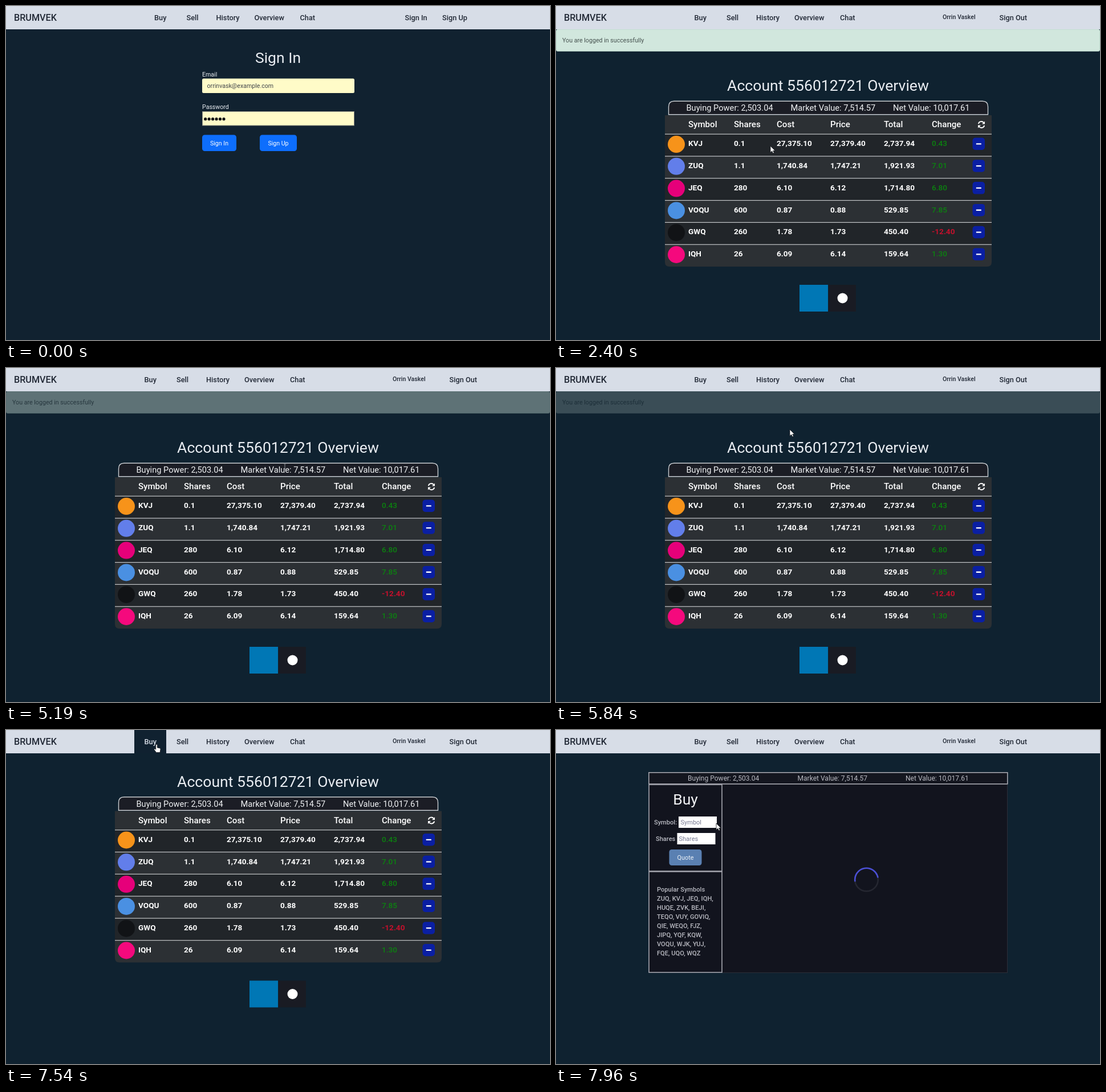
An HTML page for the animation above (8000 ms loop, 954 px wide and 587 px high).

```html
<!DOCTYPE html>
<html lang="en">
<head>
<meta charset="utf-8">
<title>Trading app</title>
<style>
  html, body { margin: 0; width: 100%; height: 100%; overflow: hidden; background: #112230; }
  svg { display: block; width: 100vw; height: 100vh; font-family: Roboto, Arial, sans-serif; }
</style>
</head>
<body>
<svg id="stage" viewBox="0 0 954 587" xmlns="http://www.w3.org/2000/svg"></svg>
<script>
const NS = 'http://www.w3.org/2000/svg';
const LOOP = 8000;
const stage = document.getElementById('stage');

function add(parent, tag, attrs = {}, content) {
  const node = document.createElementNS(NS, tag);
  for (const key in attrs) node.setAttribute(key, attrs[key]);
  if (content !== undefined) node.textContent = content;
  parent.appendChild(node);
  return node;
}
const group = (parent = stage) => add(parent, 'g');
const rect = (p, x, y, width, height, fill, more) =>
  add(p, 'rect', { x, y, width, height, fill, ...more });
const circle = (p, cx, cy, r, fill) => add(p, 'circle', { cx, cy, r, fill });
const path = (p, d, more) => add(p, 'path', { d, ...more });
const text = (p, x, y, str, size, fill, weight = 400, anchor = 'start') =>
  add(p, 'text', { x, y, 'font-size': size, fill, 'font-weight': weight, 'text-anchor': anchor }, str);

const INK = '#222936', LIGHT = '#e9edf2', BLUE = '#0d6efd';

const backdrop = rect(stage, 0, 0, 954, 587, '#112230');

// Sign-in page
const signIn = group();
text(signIn, 477, 99.5, 'Sign In', 26.5, LIGHT, 400, 'middle');
text(signIn, 344, 123.5, 'Email', 10.6, LIGHT);
rect(signIn, 344, 127.5, 267, 25.5, '#fffbc8', { rx: 2.5 });
text(signIn, 352.5, 144.3, 'orrinvask@example.com', 10.6, '#41454a');
text(signIn, 344, 181, 'Password', 10.6, LIGHT);
rect(signIn, 344.5, 185.5, 266, 24.5, '#fffbc8', { stroke: '#8b8b80' });
for (let i = 0; i < 6; i++) circle(signIn, 349.7 + i * 6.45, 198.7, 2.6, '#0d0f14');
const signInButton = rect(signIn, 344, 226.5, 60, 28.5, BLUE, { rx: 4.5 });
text(signIn, 374, 244.6, 'Sign In', 10.6, '#fff', 400, 'middle');
rect(signIn, 445, 226.5, 65, 28.5, BLUE, { rx: 4.5 });
text(signIn, 477.5, 244.6, 'Sign Up', 10.6, '#fff', 400, 'middle');

// Account overview page
const overview = group();
const STATS = ['Buying Power: 2,503.04', 'Market Value: 7,514.57', 'Net Value: 10,017.61'];
const COLS = [232, 312, 387, 481, 575, 659];
const ROWS = [
  ['#f7931a', 'KVJ', '0.1', '27,375.10', '27,379.40', '2,737.94', '0.43'],
  ['#627eea', 'ZUQ', '1.1', '1,740.84', '1,747.21', '1,921.93', '7.01'],
  ['#e6007a', 'JEQ', '280', '6.10', '6.12', '1,714.80', '6.80'],
  ['#4a90e2', 'VOQU', '600', '0.87', '0.88', '529.85', '7.85'],
  ['#111316', 'GWQ', '260', '1.78', '1.73', '450.40', '-12.40'],
  ['#f5097d', 'IQH', '26', '6.09', '6.14', '159.64', '1.30']
];
const ROW_H = 38.8;

text(overview, 477, 149, 'Account 556012721 Overview', 26.6, LIGHT, 400, 'middle');
path(overview, 'M191 192H764V450Q764 458 756 458H199Q191 458 191 450Z', { fill: '#2c3034' });
path(overview, 'M197.5 190.7V177Q197.5 167.3 207 167.3H748Q757.5 167.3 757.5 177V190.7Z',
  { fill: '#1b1d25', stroke: '#c9ccd0', 'stroke-width': 1.4 });
STATS.forEach((s, i) => text(overview, [228.5, 411.5, 591][i], 184, s, 14.65, '#f0f2f4'));
['Symbol', 'Shares', 'Cost', 'Price', 'Total', 'Change'].forEach((s, i) =>
  text(overview, COLS[i], 213.4, s, 15.1, '#fff', 500));

// Refresh icon
path(overview, 'M740.8 207A5.2 5.2 0 0 1 750 205M751.2 210A5.2 5.2 0 0 1 742 212',
  { fill: 'none', stroke: '#fff', 'stroke-width': 1.9 });
path(overview, 'M752 202.5V207.5H747ZM740 214.5V209.5H745Z', { fill: '#fff' });

ROWS.forEach(([color, ...cells], i) => {
  const y = 225.2 + i * ROW_H;
  if (i % 2 === 0) rect(overview, 191, y, 573, ROW_H, '#212529');
  rect(overview, 191, y - 0.6, 573, 1.2, '#c3c6c8');
  circle(overview, 211, y + 17.8, 15, color);
  cells.forEach((s, c) => {
    const loss = s[0] === '-';
    const fill = c < 5 ? '#fff' : loss ? '#c4102c' : '#0b830f';
    text(overview, COLS[c], y + 21, s, 13.6, fill, c < 5 || loss ? 700 : 500);
  });
  rect(overview, 730.5, y + 6.3, 21.5, 21.5, '#0a1fa3', { rx: 5 });
  rect(overview, 736.8, y + 16, 9, 2.3, '#fff', { rx: 0.6 });
});
rect(overview, 427, 490, 50, 47, '#0077b5');
rect(overview, 478, 490, 48, 47, '#191b23');
circle(overview, 502.5, 513.5, 9, '#fff');

// Buy page
const buy = group();
const SOFT = '#b9bac2';
const frame = { stroke: '#a5a6ae', 'stroke-width': 1.6 };
rect(buy, 291.5, 95.5, 500, 331, '#12141e', { stroke: '#2b2e38' });
rect(buy, 162.8, 74.8, 629, 20, '#14161f', frame);
STATS.forEach((s, i) => text(buy, [231, 423.5, 613][i], 89, s, 12.05, SOFT));
rect(buy, 163, 96, 128, 152, '#12141e', frame);
rect(buy, 163, 249, 128, 177, '#12141e', frame);
text(buy, 227, 130.6, 'Buy', 26.5, '#f1f2f5', 400, 'middle');
text(buy, 172, 165.8, 'Symbol:', 11.1, SOFT, 500);
rect(buy, 215, 152, 67, 20, '#fff');
text(buy, 218.5, 165.8, 'Symbol', 11, '#777a92');
text(buy, 175, 194.8, 'Shares', 11.1, SOFT, 500);
rect(buy, 212.5, 181, 67, 20, '#fff');
text(buy, 215.5, 194.8, 'Shares', 11, '#777a92');
rect(buy, 198.5, 210, 57, 28, '#5a80b2', { rx: 4.5 });
text(buy, 227, 227.8, 'Quote', 10.9, '#eef2f8', 400, 'middle');
[
  'Popular Symbols', 'ZUQ, KVJ, JEQ, IQH,', 'HUQE, ZVK, BEJI,', 'TEQO, VUY, GOVIQ,',
  'QIE, WEQO, FJZ,', 'JIPQ, YQF, KQW,', 'VOQU, WJK, YUJ,', 'FQE, UQO, WQZ'
].forEach((s, i) => text(buy, 177, 283.5 + i * 16, s, 11.1, SOFT, 500));

add(buy, 'circle', { cx: 544.5, cy: 263, r: 20.3, fill: 'none', stroke: '#252731', 'stroke-width': 2.6 });
const spinner = path(buy, 'M524.5 266.5A20.3 20.3 0 0 1 564.5 259.5',
  { fill: 'none', stroke: '#4a4fd6', 'stroke-width': 2.6 });

// Alert below the navigation bar
const alertBar = group();
rect(alertBar, 0.5, 41.5, 953, 37.8, '#d1e7dd', { stroke: '#c3dfd2', rx: 2 });
text(alertBar, 11, 64.2, 'You are logged in successfully', 10.66, '#46524f');

// Navigation
const nav = group();
rect(nav, 0, 0, 954, 41, '#d7dde7');
text(nav, 14, 25.7, 'BRUMVEK', 16.2, INK, 500);
const LINKS = [[260, 'Buy'], [316.5, 'Sell'], [368.5, 'History'], [435.5, 'Overview'], [515.5, 'Chat']];
function links(shift) {
  const g = group(nav);
  LINKS.forEach(([x, s]) => text(g, x + shift, 24.5, s, 12.75, INK, 500));
  return g;
}
const guestNav = links(0);
text(guestNav, 699.5, 24.5, 'Sign In', 12.75, INK, 500);
text(guestNav, 765, 24.5, 'Sign Up', 12.75, INK, 500);
const userNav = links(-17.5);
text(userNav, 678, 23.2, 'Orrin Vaskel', 10.6, INK, 500);
text(userNav, 777.5, 24.5, 'Sign Out', 12.75, INK, 500);
const buyHover = group(nav);
rect(buyHover, 225, 0, 56, 41, '#102130');
text(buyHover, 242.5, 24.5, 'Buy', 12.75, '#d7dde7', 500);

// Pointer shapes, each with its hot spot at 0,0
const pointer = group();
const shapes = {
  arrow: path(pointer, 'M0 0V11.5L2.7 9L4.6 13L6.5 12.1L4.7 8.3H8.2Z',
    { fill: '#fff', stroke: '#15181d', 'stroke-width': 0.8 }),
  beam: path(pointer, 'M-2.5 -5H2.5M0 -5V5M-2.5 5H2.5', { fill: 'none', stroke: '#8b9096' }),
  hand: path(pointer,
    'M-1.3 1Q0 -1 1.3 1V6L6 7Q7.3 7.4 7 9L6 14.5H-0.5L-4.3 9.3Q-4.3 7.4 -2.5 8.2L-1.3 9.3Z',
    { fill: '#fff', stroke: '#15181d', 'stroke-width': 0.8 })
};

// time, x, y, shape until the next stop
const TRACK = [
  [2000, 376, 246, 'arrow'], [2810, 376, 246, 'arrow'],
  [3230, 489, 173, 'beam'], [5200, 489, 173, 'arrow'],
  [5840, 410, 108, 'arrow'], [6040, 410, 108, 'arrow'],
  [6300, 310, 60, 'arrow'], [6500, 268, 34, 'hand'],
  [6640, 264.5, 21.5, 'hand'], [7400, 264.5, 21.5, 'hand'],
  [7520, 264, 25, 'hand'], [7680, 264, 25, 'arrow'],
  [7900, 281, 164, 'arrow'], [LOOP, 281, 164, 'arrow']
];

const show = (node, on) => node.setAttribute('visibility', on ? 'visible' : 'hidden');
const clamp = v => Math.min(1, Math.max(0, v));
const ease = v => 0.5 - 0.5 * Math.cos(Math.PI * clamp(v));

function drawPointer(t) {
  const i = TRACK.findIndex((s, n) => t >= s[0] && t < TRACK[n + 1]?.[0]);
  for (const key in shapes) show(shapes[key], i >= 0 && key === TRACK[i][3]);
  if (i < 0) return Infinity;
  const [t0, x0, y0] = TRACK[i], [t1, x1, y1] = TRACK[i + 1];
  const k = ease((t - t0) / (t1 - t0));
  const y = y0 + (y1 - y0) * k;
  pointer.setAttribute('transform', `translate(${x0 + (x1 - x0) * k} ${y})`);
  return y;
}

function draw(t) {
  const user = t >= 2000, buying = t >= 7680;
  show(signIn, !user);
  show(guestNav, !user);
  show(userNav, user);
  show(overview, user && !buying);
  show(buy, buying);
  backdrop.setAttribute('fill', user ? '#0f2230' : '#112230');
  signInButton.setAttribute('fill', t < 1530 ? BLUE : t < 1600 ? '#0d60dc' : t < 1730 ? '#0b5ed7' : '#0a58ca');

  show(alertBar, user && t < 7400);
  alertBar.setAttribute('opacity', 1 - ease((t - 2400) / 5000));
  overview.setAttribute('transform', `translate(0 ${t < 7400 ? 0 : -49.5})`);
  spinner.setAttribute('transform', `rotate(${(t - 7960) * 0.36} 544.5 263)`);

  const y = drawPointer(t);
  show(buyHover, t >= 6500 && y < 41);
}

const start = performance.now();
function tick() {
  draw((performance.now() - start) % LOOP);
  requestAnimationFrame(tick);
}
tick();
</script>
</body>
</html>
```
